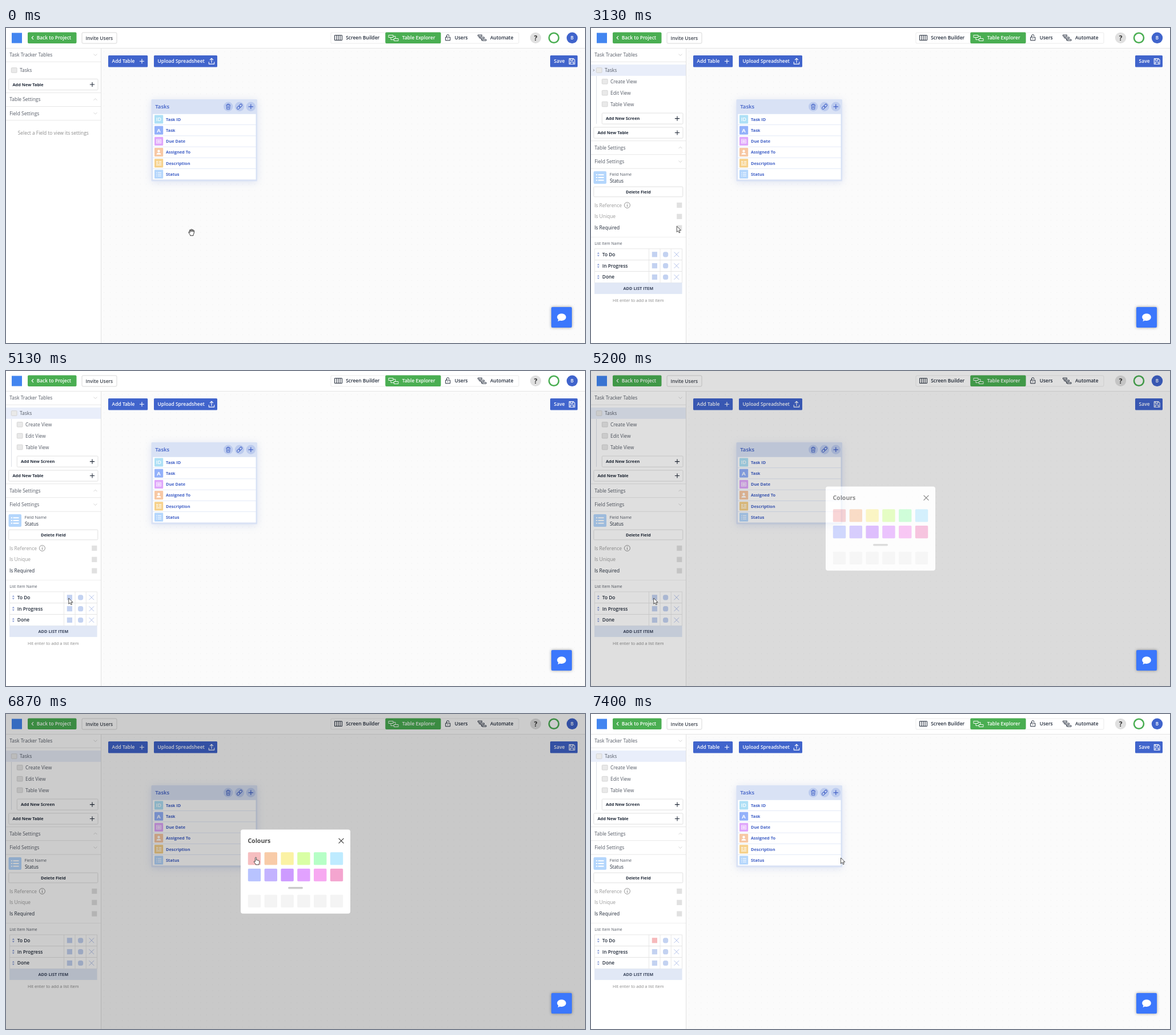
Recreate the animation shown at these times as an HTML page. Size 1014x552 px, loop 8000 ms.

```html
<!DOCTYPE html>
<html lang="en">
<head>
<meta charset="utf-8">
<title>Table explorer</title>
<style>
  html, body { margin: 0; width: 100%; height: 100%; overflow: hidden; background: #fafafa; }
  svg { display: block; width: 100vw; height: 100vh; font-family: "Open Sans", "Noto Sans", sans-serif; }
</style>
</head>
<body>
<svg id="stage" viewBox="0 0 1014 552"></svg>
<script>
const BLUE = '#4064cc', GREEN = '#4aae52', INK = '#222b3a', GREY = '#555b66', LINE = '#e2e2e2';

const rect = (x, y, w, h, fill, rx = 0, extra = '') =>
  `<rect x="${x}" y="${y}" width="${w}" height="${h}" fill="${fill}" rx="${rx}" ${extra}/>`;
const box = (x, y, w, h, stroke = '#d8d8d8', rx = 1.5) =>
  rect(x, y, w, h, '#fff', rx, `stroke="${stroke}" stroke-width=".8"`);
const circle = (x, y, r, fill, extra = '') => `<circle cx="${x}" cy="${y}" r="${r}" fill="${fill}" ${extra}/>`;
const path = (d, stroke, width = 1, fill = 'none') =>
  `<path d="${d}" stroke="${stroke}" stroke-width="${width}" fill="${fill}" stroke-linejoin="round"/>`;
// y is the middle of the capitals
const text = (s, x, y, size, fill, weight = 500, anchor = 'start') =>
  `<text x="${x}" y="${y + size * 0.36}" font-size="${size}" fill="${fill}" font-weight="${weight}" text-anchor="${anchor}">${s}</text>`;
const plus = (x, y, r, color, w = 1.1) => path(`M${x - r} ${y}h${2 * r}M${x} ${y - r}v${2 * r}`, color, w);
const cross = (x, y, r, color, w = 1) =>
  path(`M${x - r} ${y - r}l${2 * r} ${2 * r}M${x - r} ${y + r}l${2 * r} ${-2 * r}`, color, w);
const group = (id, body) => `<g id="${id}">${body}</g>`;

function topBar() {
  return rect(0, 0, 1014, 35, '#fff') + rect(0, 35, 1014, .9, '#e4e4e4') +
    rect(10, 8.5, 18, 18, '#4285f0') +
    rect(38, 7.5, 85.5, 19.5, GREEN, 2) + path('M48 14.2l-2.8 3 2.8 3', '#fff', 1.2) +
    text('Back to Project', 53.7, 17.2, 8.4, '#fff', 600) +
    box(133, 8, 61, 19, '#cfcfcf', 2) + text('Invite Users', 163.3, 17.6, 8.4, '#3c424c', 600, 'middle') +
    box(569, 8, 329, 19, '#e6e6e6', 2) + rect(664.3, 7.5, 97.3, 19.5, GREEN, 2) +
    path('M575.5 12.8h13v8.6h-13zM578.8 12.8v8.6M582 12.8v8.6M585.2 12.8v8.6', INK, 1) +
    text('Screen Builder', 595.2, 17.2, 8.45, INK, 600) +
    path('M670 12.5h8v4h-8zM679.5 18.5h7.5v4h-7.5zM678 14.5h4v4M674 16.5v4h5.5', '#fff', .9) +
    text('Table Explorer', 693.8, 17.2, 8.45, '#fff', 600) +
    path('M769.8 16h8v5.8h-8zM771.5 16v-2q0-2.3 2.3-2.3t2.3 2.3M773.8 18v1.6', INK, 1) +
    text('Users', 785.7, 17.2, 8.45, INK, 600) +
    path('M826.5 12h7v2.2h-7zM830.5 16h7v2.2h-7zM834 20h7v2.2h-7zM828.5 14.2v3h2M832.5 18.2v3h1.5', INK, .9) +
    text('Automate', 848, 17.2, 8.45, INK, 600) +
    circle(927.5, 17.3, 9.6, '#e0e0e0') + text('?', 927.5, 17.3, 12, '#333', 700, 'middle') +
    circle(959.5, 17.3, 8.5, '#fff', `stroke="${GREEN}" stroke-width="2.6"`) +
    circle(991.5, 17.3, 9.7, BLUE) + text('B', 991.5, 17.3, 8, '#fff', 600, 'middle');
}

const button = (x, w, label, icon) =>
  rect(x, 48, w, 20.6, BLUE, 1.5) + text(label, x + 6.6, 58.3, 8.45, '#fff', 600) + path(icon, '#fff', 1.1);

function tableCard() {
  const fields = [
    ['Task ID', '#aee0f6'], ['Task', '#93b1fa'], ['Due Date', '#dfa6fb'],
    ['Assigned To', '#f7c8a4'], ['Description', '#f6d18b'], ['Status', '#b4d6fc']
  ];
  const glyphs = [
    y => text('ID', 267.5, y, 9, '#fff', 600, 'middle'),
    y => text('A', 267.5, y, 9.5, '#fff', 700, 'middle'),
    y => path(`M263.5 ${y - 3.3}h8v6.8h-8zM264.5 ${y - 1}h6M264.5 ${y + 1.2}h6M266.3 ${y - 2}v4.5M268.8 ${y - 2}v4.5`, '#fff', .8),
    y => circle(267.5, y - 2, 2.2, '#fff') + path(`M263.6 ${y + 4}q0-3 3.9-3t3.9 3z`, 'none', 0, '#fff'),
    y => path(`M263 ${y - 2.8}h3.5M267.8 ${y - 2.8}h4.5M263 ${y}h3.5M267.8 ${y}h4.5M263 ${y + 3}h9.3`, '#fff', 1.3),
    y => path(`M263 ${y - 3}h1.4M265.8 ${y - 3}h6.2M263 ${y}h1.4M265.8 ${y}h6.2M263 ${y + 3}h1.4M265.8 ${y + 3}h6.2`, '#fff', 1.1)
  ];
  const rows = fields.map(([name, color], i) => {
    const y = 160 + i * 19.24;
    return rect(257.3, y - 9.2, 180.2, 18.5, '#fff') + rect(260, y - 7.6, 15.2, 15.2, color, 1) +
      glyphs[i](y) + text(name, 280, y, 7.4, '#3f5fc6', 700);
  }).join('');
  const tools = [389.2, 409, 428.8].map(x => circle(x, 137.8, 8.2, '#bccbee')).join('');
  return rect(254.5, 125, 185.5, 143.5, '#d9e2f5', 1.5, 'style="filter:drop-shadow(0 2px 7px #5a78c830)"') +
    text('Tasks', 261.2, 137.8, 9.6, '#3f5fc6', 600) + tools +
    path('M385.3 135h7.8M387.6 135v-1.7h3.2v1.7M386.2 135l.5 7.3h5l.5-7.3M388.3 137v3.5M390.1 137v3.5', '#3f5fc6', .9) +
    `<g transform="rotate(-45 409 137.8)">${rect(403.4, 135.8, 6, 4, 'none', 2, 'stroke="#3f5fc6"')}${rect(408.6, 135.8, 6, 4, 'none', 2, 'stroke="#3f5fc6"')}</g>` +
    plus(428.8, 137.8, 4.2, '#3f5fc6', 1.2) + rows + group('rowCross', cross(427.5, 256.2, 4, '#8d8d8d'));
}

const heading = (label, y, up) =>
  text(label, 6.3, y, 8.45, GREY) + rect(0, y + 11.8, 166, .8, LINE) +
  path(up ? `M153.5 ${y + 1.5}l3-3 3 3` : `M153.5 ${y - 1.5}l3 3 3-3`, '#c9c9c9', .8);
const tableIcon = (x, y) => rect(x, y - 4.3, 9.8, 8.6, '#e9e9e9', 1, 'stroke="#cfcfcf" stroke-width=".8"');
const addButton = (x, y, label) =>
  box(x, y - 9.6, 161 - x, 19.2) + text(label, x + 6.6, y, 7.4, INK, 700) + plus(151, y, 4.1, INK);
const settings = y =>
  rect(0, y - 12.2, 166, .8, LINE) + heading('Table Settings', y, true) + heading('Field Settings', y + 24.4);

function listItem(label, y, i) {
  return box(6.3, y - 9.9, 153.2, 19.8, LINE, 0) +
    path(`M101.5 ${y - 9.9}v19.8M121 ${y - 9.9}v19.8M140.3 ${y - 9.9}v19.8`, LINE, .8) +
    path(`M10.8 ${y - 1}l2-2.8 2 2.8zM10.8 ${y + 1}l2 2.8 2-2.8z`, 'none', 0, '#8d9fd6') +
    text(label, 19.8, y, 8.3, INK, 600) +
    rect(106.8, y - 4.6, 9.2, 9.2, '#c3d2f1', 0, `id="swatch${i}"`) +
    rect(126, y - 4.6, 9.2, 9.2, '#c3d2f1', 3.6) + cross(149.8, y, 4.3, '#b2c1ea');
}

function selectedSidebar() {
  const views = ['Create View', 'Edit View', 'Table View'].map((label, i) =>
    tableIcon(19.3, 93.8 + i * 19.85) + text(label, 34, 93.8 + i * 19.85, 8.45, GREY)).join('');
  const checks = ['Is Reference', 'Is Unique', 'Is Required'].map((label, i) => {
    const y = 310.5 + i * 19.8;
    return text(label, 6, y, 8.45, i < 2 ? '#9b9b9b' : INK) + rect(150.2, y - 4.6, 9.2, 9.2, '#e1e1e1');
  }).join('');
  return rect(0, 64, 166, 19.8, '#e9eefa') + rect(9, 84, 1, 84, '#dcdfe6') + views +
    addButton(19.3, 158.6, 'Add New Screen') + addButton(4.8, 183.5, 'Add New Table') + settings(209.6) +
    rect(4.5, 251, 22.5, 22, '#b4d6fc', 2) +
    path('M8.8 257.3h2.2M12.5 257.3h10M8.8 262h2.2M12.5 262h10M8.8 266.7h2.2M12.5 266.7h10', '#fff', 2) +
    text('Field Name', 32.4, 256.3, 7.4, GREY, 400) + text('Status', 33, 268, 8.3, INK) +
    box(4.8, 278.2, 156, 17.6) + text('Delete Field', 82.8, 287, 7.4, INK, 700, 'middle') + checks +
    circle(63.4, 310.5, 5, 'none', 'stroke="#777" stroke-width=".8"') + path('M63.4 307.8v1.2M63.4 310v3.3', '#777', 1) +
    rect(0, 366, 166, .8, '#ebebeb') + text('List Item Name', 6.3, 377.8, 6.86, GREY) +
    ['To Do', 'In Progress', 'Done'].map((s, i) => listItem(s, 396.8 + i * 19.85, i)).join('') +
    rect(6, 446.3, 153.6, 19.8, '#e1e8f6') + text('ADD LIST ITEM', 82.8, 456, 7.4, '#39445c', 700, 'middle') +
    text('Hit enter to add a list item', 82.8, 477.7, 7.38, '#888', 400, 'middle');
}

function sidebar() {
  return rect(0, 35.9, 166, 517, '#fff') + rect(166, 35.9, .9, 517, '#dedede') +
    heading('Task Tracker Tables', 47) +
    group('plain', addButton(4.8, 99, 'Add New Table') + settings(125.2) +
      text('Select a Field to view its settings', 82.8, 183.5, 8.38, '#8c8c8c', 500, 'middle')) +
    group('selected', selectedSidebar()) +
    tableIcon(9.3, 74) + text('Tasks', 24, 74, 8.45, GREY) +
    group('caret', path('M4 72.3l1.6 1.7-1.6 1.7', '#666', .8));
}

function colourDialog() {
  const colours = ['#f6bec0', '#f8cba8', '#fbf2a4', '#d9ffa4', '#b6ffc6', '#beebff',
    '#b8c3ff', '#c3b3ff', '#cd9bff', '#e2a2ff', '#f7a9f1', '#f4a5cf'];
  const tile = (i, y, fill) => rect(423.8 + i * 28.8, y, 22.4, 22.2, fill, 1.6);
  return rect(411, 202.5, 192, 147.3, '#fff', 4) + text('Colours', 423.4, 222.3, 10.56, '#4a4a4a', 700) +
    cross(587, 222.3, 4.4, '#444', 1.2) +
    colours.map((c, i) => tile(i % 6, i < 6 ? 242.3 : 271, c)).join('') +
    rect(494, 303, 26, 3.6, '#cbcbcb', 1.8) +
    colours.slice(6).map((c, i) => tile(i, 316.7, '#f4f4f4')).join('');
}

const cursors = {
  arrow: path('M0 0V10.2L2.4 8 4 11.6 5.7 10.9 4.2 7.3H7.2Z', '#222', .8, '#fff'),
  hand: path('M-1 6.5V.3Q-1-.8 0-.8T1 .3V4.2Q1.2 3.5 2 3.6T2.9 4.6Q3.2 4 3.9 4.2T4.7 5.2Q5 4.8 5.6 5T6.3 6V8.2Q6.3 9.5 5.5 10.5V12H-.3V11Q-2 9-3.2 7-3.3 5.8-2.3 6Z', '#222', .8, '#fff'),
  grab: path('M-2.5 5.8V4.5Q-4.5 2-5.2 0-5.3-1.2-4-.8L-2.8.6-3.6-3.2Q-3.7-4.6-2.4-4.2L-1.4-1-1.3-4.6Q-1-5.9 0-5.3L.5-1.2 1.2-4.6Q2-5.6 2.7-4.5L2.5-.8 3.5-3Q4.5-3.7 4.9-2.6L4 2Q3.8 3.2 3 4.2V5.8Z', '#222', .9, '#fff'),
  beam: path('M-2.3-5Q0-5 0-4 0-5 2.3-5M0-4V4M-2.3 5Q0 5 0 4 0 5 2.3 5', '#333', .9)
};

const stage = document.getElementById('stage');
stage.innerHTML =
  `<defs><pattern id="dots" x="166.5" y="36" width="10.56" height="10.56" patternUnits="userSpaceOnUse">${circle(5.3, 5.3, .6, '#ececec')}</pattern></defs>` +
  rect(0, 0, 1014, 552, '#fbfbfb') + rect(166, 35, 848, 517, 'url(#dots)') +
  button(179, 69.2, 'Add Table', 'M234 58.3h8M238 54.3v8') +
  button(259, 111, 'Upload Spreadsheet', 'M355.3 59.3v3.8h9.4v-3.8M360 61v-7.6M357 56.2l3-3 3 3') +
  button(953, 48, 'Save', 'M986.3 53.6h7.4l2.3 2.3v7.4h-9.7zM988.3 53.6v3h4.5v-3M988.3 63.3v-3.8h5.5v3.8') +
  tableCard() + sidebar() + topBar() +
  group('dialog', rect(0, 0, 1014, 552, '#000', 0, 'opacity=".2"') + colourDialog()) +
  rect(955, 489, 36, 36, '#3b77fc', 2, 'style="filter:drop-shadow(0 0 2.5px #0006)"') +
  path('M973 500.5c4.5 0 7.8 2.7 7.8 6.2s-3.3 6.2-7.8 6.2q-1.6 0-3-.5-1.6 1.3-4 1.3 1.3-1.3 1.4-2.8-2.2-1.7-2.2-4.2c0-3.500 3.300-6.200 7.800-6.200z', 'none', 0, '#fff') +
  group('cursor', Object.entries(cursors).map(([id, shape]) => group(id, shape)).join(''));

// Pointer moves: waypoints of [time, x, y]; the pointer rests between moves.
const moves = [
  [[333, 325, 358], [733, 306, 308], [1200, 314, 262]],
  [[2200, 314, 262], [2667, 242, 285], [3133, 150.3, 347.300], [3533, 107, 383], [3933, 108.5, 392]],
  [[4533, 108.5, 392], [4600, 111.5, 400.5], [4667, 109.8, 398]],
  [[5733, 109.8, 398], [6200, 250, 338], [6600, 397, 267], [6867, 437.5, 252]]
];

function hermite(points, i, axis, t) {
  const slope = k => k === 0 || k === points.length - 1 ? 0 :
    (points[k + 1][axis] - points[k - 1][axis]) / (points[k + 1][0] - points[k - 1][0]);
  const [a, b] = [points[i], points[i + 1]], span = b[0] - a[0], u = (t - a[0]) / span, v = 1 - u;
  return a[axis] * v * v * (1 + 2 * u) + b[axis] * u * u * (3 - 2 * u) +
    span * u * v * (v * slope(i) - u * slope(i + 1));
}

function pointer(t) {
  const points = moves.filter(m => m[0][0] <= t).pop() || moves[0];
  const time = Math.max(points[0][0], Math.min(t, points[points.length - 1][0]));
  const next = points.findIndex(p => p[0] >= time), i = Math.max(0, next - 1);
  return [hermite(points, i, 1, time), hermite(points, i, 2, time)];
}

function cursorKind(t, x, y) {
  if (t > 5130) return t < 7390 && x >= 424 ? 'hand' : 'arrow';
  if (x < 166) return y > 387 && x > 101 ? 'hand' : 'arrow';
  return x > 257 && x < 437 && y < 266 ? 'beam' : 'grab';
}

function dialogOpacity(t) {
  if (t > 7200) return Math.max(0, 1 - (t - 7200) / 200);
  const p = Math.max(0, Math.min(1, (t - 5134) / 170));
  return 1 - (1 - p) ** 2;
}

const el = id => document.getElementById(id);
const show = (id, on) => el(id).setAttribute('visibility', on ? 'visible' : 'hidden');
const STEP = 1000 / 15;

function draw(now) {
  const t = Math.floor((now % 8000 + 4) / STEP) * STEP;
  const [x, y] = pointer(t), kind = cursorKind(t, x, y), selected = t > 1460;
  el('cursor').setAttribute('transform', `translate(${x} ${y})`);
  for (const id in cursors) show(id, id === kind);
  show('rowCross', kind === 'beam');
  show('plain', !selected);
  show('selected', selected);
  show('caret', t > 3060 && t < 5130);
  el('swatch0').setAttribute('fill', t > 7260 ? '#f6b9bb' : '#c3d2f1');
  el('dialog').setAttribute('opacity', dialogOpacity(t));
  requestAnimationFrame(draw);
}
requestAnimationFrame(draw);
</script>
</body>
</html>
```
